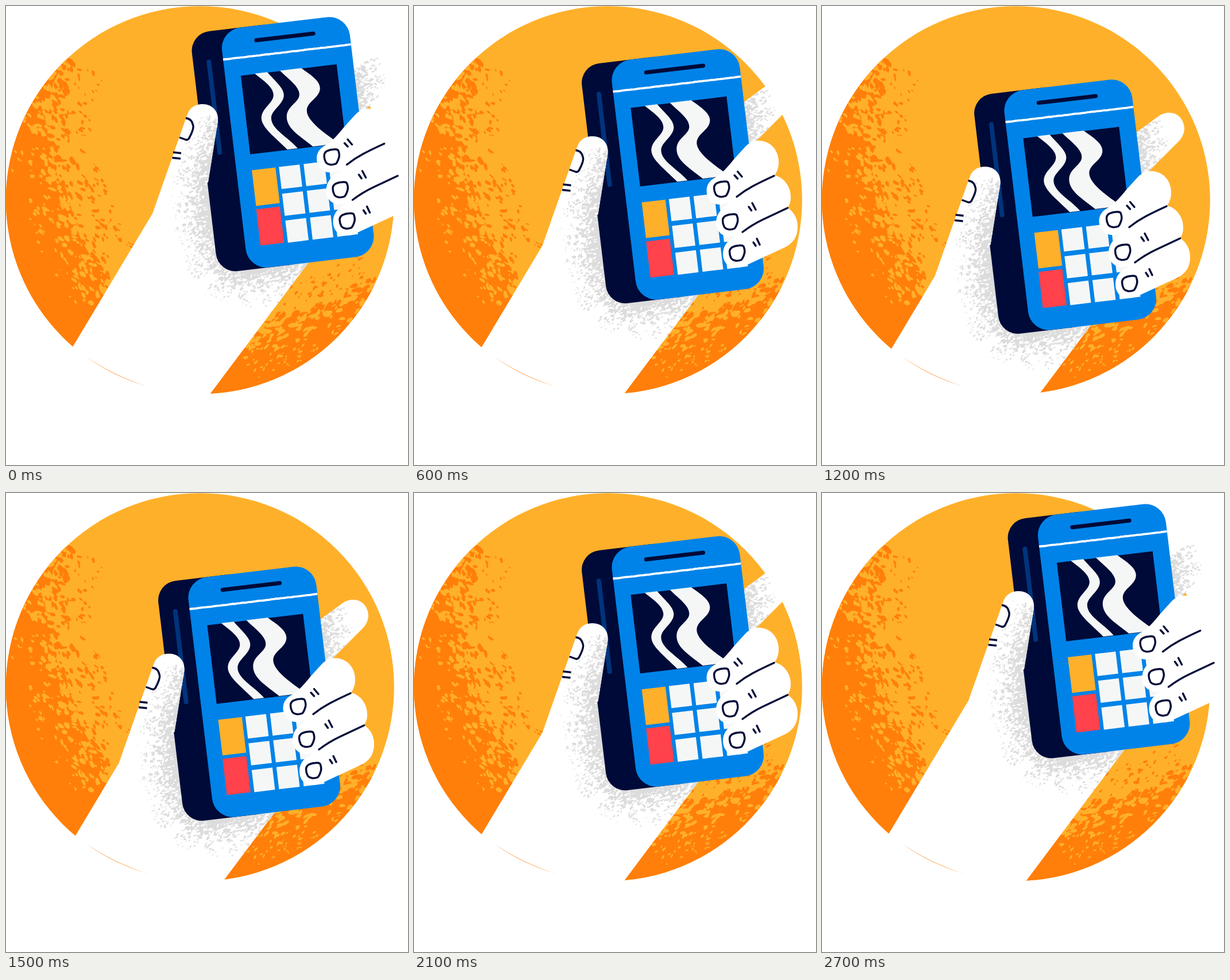
Recreate the animation shown at these times as an HTML page. Size 700 by 800 pixels, loop 2.85 s.

```html
<!DOCTYPE html>
<html lang="en">
<head>
<meta charset="utf-8">
<title>Card reader in hand</title>
<style>
html, body { margin: 0; width: 100%; height: 100%; overflow: hidden; background: #fff; }
svg { display: block; width: 700px; height: 800px; }
.navy { fill: #000a38; }
.blue { fill: #0083e8; }
.amber { fill: #ffb02a; }
.orange { fill: #ff7f0a; }
.white { fill: #fff; }
.grey { fill: #dcdcdc; }
.pale { fill: #f5f7f7; }
.ink { fill: none; stroke: #000a38; stroke-width: 3.4; stroke-linecap: round; stroke-linejoin: round; }
</style>
</head>
<body>
<svg viewBox="0 0 700 800">
  <defs>
    <clipPath id="disc"><circle cx="337.8" cy="338.2" r="338"/></clipPath>
    <clipPath id="screen"><path d="M351 229.5L518.3 209.6 534.6 346.7 367.3 366.6Z"/></clipPath>
    <path id="palmShape" d="M257 299L197 470-60 900H211L380 674 470 554 500 508Z"/>
    <path id="thumbShape" d="M197 470L257 299C261 286 271 280 284 280C301 280 312 293 310.500 309Q309.500 318 307.500 328L293.500 416Z"/>
    <path id="indexShape" d="M540 226L586 192C601 182 619 185 627 199C634 212 631 225 622 235L566 291 540 300Z"/>
    <clipPath id="palmClip"><use href="#palmShape"/></clipPath>
    <clipPath id="thumbClip"><use href="#thumbShape"/></clipPath>
    <clipPath id="indexClip"><use href="#indexShape"/></clipPath>
    <g id="handShade"></g>
    <path id="nail" d="M-13 -2Q-13 -7 -8.500 -10Q-2 -13 3 -13Q11 -14 12 -10Q14 -4 13 0Q11 8 7.500 12Q2 14 -2 13.500Q-7 13 -10 9.500Q-13 4 -13 -2Z"/>
  </defs>

  <g clip-path="url(#disc)">
    <rect class="amber" width="700" height="700"/>
    <g id="grain"></g>
  </g>

  <g id="hand">
    <use href="#indexShape" class="white"/>
    <g id="indexShade" clip-path="url(#indexClip)"></g>
    <use href="#palmShape" class="white"/>
    <g clip-path="url(#palmClip)"><use href="#handShade"/></g>

    <g transform="translate(313.4 150.8) rotate(-6.8)">
      <rect class="navy" x="-52.5" width="160" height="421" rx="34"/>
      <path d="M-25 53V212" stroke="#00347c" stroke-width="8" stroke-linecap="round"/>
      <rect class="blue" width="224.300" height="421" rx="36"/>
      <path id="seam" fill="none" stroke="#fff" stroke-width="3.800"/>
      <g transform="translate(.3 2)">
        <path class="ink" d="M61 23.4H161" style="stroke-width:7"/>
        <rect class="navy" x="27" y="81.5" width="168" height="138"/>
        <rect class="amber" x="26.5" y="247.5" width="41.5" height="62.5"/>
        <rect x="26" y="316" width="41.5" height="63.5" fill="#ff424b"/>
        <g id="keys" class="pale"></g>
      </g>
    </g>
    <g class="pale" clip-path="url(#screen)" transform="translate(-.7 .3)">
      <path d="M374 225C384 235 408 248 408 264C408 278 387 287 387 304C387 321 412 338 435 362L453 360C434 337 404 324 404 304C404 290 426 280 426 264C426 250 407 237 394 220Z"/>
      <path d="M418 220C432 235 453 248 453 263C453 277 431 283 431 302C431 324 457 337 482 358L525 350C497 331 466 309 466 291C466 275 489 269 489 252C489 238 470 227 452 214Z"/>
    </g>

    <use href="#thumbShape" class="white"/>
    <g clip-path="url(#thumbClip)"><use href="#handShade"/></g>

    <g class="white">
      <path d="M482.500 374C483 362 490 356 499 351C512 343 521 331 531 319L551 297C559 290 567 287 577 288C596 290 608 306 608 325C608 335 605 343 600 349L535 386C522 396 514 400 504 399C491 398 482 387 482.500 374Z"/>
      <path d="M499 431C499 417 506 408 520 397L535 384 601 348C617 352 629 367 629 386C629 394 627 400 623 405L545 447C535 454 527 456 519 455C507 453 499 443 499 431Z"/>
      <path d="M511 485C511 473 517 463 530 456L545 446 623 404C635 412 641 424 641 438C641 455 633 467 618 474L549 506C541 509 536 510 528 508C517 506 511 497 511 485Z"/>
    </g>
    <g class="ink">
      <path d="M535 385.500Q548 375 563 367T600 349M545 447Q562 434 581 425T623.500 405"/>
      <path d="M531 348L536.500 354M536.500 341.500L544 350.500M556 403L560.500 409.500M562 396.500L568 408M564 465L568 471M570 458.500L575 469"/>
      <path d="M254.500 304.500Q265 305 267.500 318Q268.500 324 260.500 339Q258.500 343 254.500 342L243.500 338M232.500 364L246.500 365.500M231 373.500L245.500 375" style="stroke-linecap:butt"/>
      <use href="#nail" transform="translate(508.500 372)"/>
      <use href="#nail" transform="translate(523.500 429)"/>
      <use href="#nail" transform="translate(535.500 483.500)"/>
    </g>
  </g>
  <path class="orange" opacity=".7" d="M139 611A337.5 337.5 0 0 0 247 663.300A410 410 0 0 1 139 611Z"/>
</svg>
<script>
const $ = id => document.getElementById(id);

let seed = 7;
function rnd() {
  seed = (seed + 0x6D2B79F5) | 0;
  let v = Math.imul(seed ^ (seed >>> 15), 1 | seed);
  v = (v + Math.imul(v ^ (v >>> 7), 61 | v)) ^ v;
  return ((v ^ (v >>> 14)) >>> 0) / 4294967296;
}

function add(parent, tag, attrs) {
  const el = document.createElementNS('http://www.w3.org/2000/svg', tag);
  for (const k in attrs) el.setAttribute(k, attrs[k]);
  parent.appendChild(el);
}

// One ragged, elongated fleck.
function fleck(x, y, len, angle) {
  const c = Math.cos(angle), s = Math.sin(angle), thin = 0.35 + rnd() * 0.3;
  const pts = [];
  for (let i = 0; i < 7; i++) {
    const a = i / 7 * Math.PI * 2, r = len / 2 * (0.6 + rnd() * 0.6);
    const px = Math.cos(a) * r, py = Math.sin(a) * r * thin;
    pts.push((x + px * c - py * s).toFixed(1) + ' ' + (y + px * s + py * c).toFixed(1));
  }
  return 'M' + pts.join('L') + 'Z';
}

// Flecks scattered to one side of a polyline, thinning out with distance.
function scatter(edge, count, reach, size, tilt) {
  const segs = edge.slice(1).map((b, i) => {
    const a = edge[i], dx = b[0] - a[0], dy = b[1] - a[1];
    return { a, dx, dy, len: Math.hypot(dx, dy) };
  });
  const total = segs.reduce((sum, g) => sum + g.len, 0);
  let d = '';
  for (let i = 0; i < count; i++) {
    let at = rnd() * total, j = 0;
    while (j < segs.length - 1 && at > segs[j].len) at -= segs[j++].len;
    const g = segs[j], k = at / g.len, far = Math.pow(rnd(), 1.6), off = far * reach;
    const x = g.a[0] + g.dx * k + g.dy / g.len * off;
    const y = g.a[1] + g.dy * k - g.dx / g.len * off;
    const len = size * (0.45 + rnd() * 0.9) * (1 - far * 0.55);
    d += fleck(x, y, len, tilt + (rnd() - 0.5) * 1.3);
  }
  return d;
}

// Solid area whose open edge breaks up into flecks both ways.
function shade(parent, o) {
  const solid = 'M' + o.edge.concat(o.close).join('L') + 'Z';
  add(parent, 'path', { class: o.tone, d: solid });
  add(parent, 'path', { class: o.tone, d: scatter(o.edge, o.n, o.out, o.size, o.tilt) });
  add(parent, 'path', { class: o.gap, d: scatter(o.edge, o.m, -o.inn, o.size, o.tilt) });
}

shade($('grain'), {
  tone: 'orange', gap: 'amber', n: 210, m: 230, out: 74, inn: 75, size: 16, tilt: 0.85,
  edge: [[104, 92], [82, 135], [72, 180], [72, 230], [88, 290], [108, 350], [132, 410], [162, 460], [178, 510]],
  close: [[150, 620], [-20, 620], [-20, 92]]
});
shade($('grain'), {
  tone: 'orange', gap: 'amber', n: 140, m: 180, out: 62, inn: 80, size: 14, tilt: -0.6,
  edge: [[400, 600], [450, 558], [500, 540], [550, 532], [600, 510], [650, 484]],
  close: [[690, 500], [690, 700], [340, 700]]
});
shade($('handShade'), {
  tone: 'grey', gap: 'white', n: 800, m: 300, out: -44, inn: -20, size: 7.5, tilt: -0.6,
  edge: [[310, 305], [300, 345], [284, 385], [272, 430], [274, 480], [290, 530], [306, 572], [345, 591], [400, 589], [450, 570], [480, 552]],
  close: [[480, 500], [340, 500], [320, 305]]
});
shade($('indexShade'), {
  tone: 'grey', gap: 'white', n: 190, m: 70, out: 36, inn: 18, size: 7.5, tilt: -0.5,
  edge: [[552, 205], [566, 232], [570, 260], [562, 295]],
  close: [[535, 295], [535, 205]]
});

for (let r = 0; r < 3; r++)
  for (let c = 0; c < 3; c++)
    add($('keys'), 'rect', { x: 74 + c * 43.3, y: 247.3 + r * 47, width: 36.3, height: 38.8 });

let seam = 'M0 52';
for (let x = 4; x < 224; x += 4) seam += `L${x} ${(51.7 + rnd() * 0.6).toFixed(1)}`;
$('seam').setAttribute('d', seam + 'L224 52');

// Stepped swing: ten poses out, then the same ones back.
const STEP = 150, LOOP = 2850, LAST = 9;
const DX = [58.5, 52, 39.5, 33.5, 27, 20, 13, 6.5, 0, -6.5];
const DY = [-109, -96, -75, -66, -53, -40, -27, -13, 0, 13];

function draw(ms) {
  const n = Math.floor(ms % LOOP / STEP);
  const k = n > LAST ? 2 * LAST - n : n;
  $('hand').setAttribute('transform', `translate(${DX[k]} ${DY[k]})`);
}

const start = performance.now();
function tick() {
  draw(performance.now() - start);
  requestAnimationFrame(tick);
}
tick();
</script>
</body>
</html>
```
